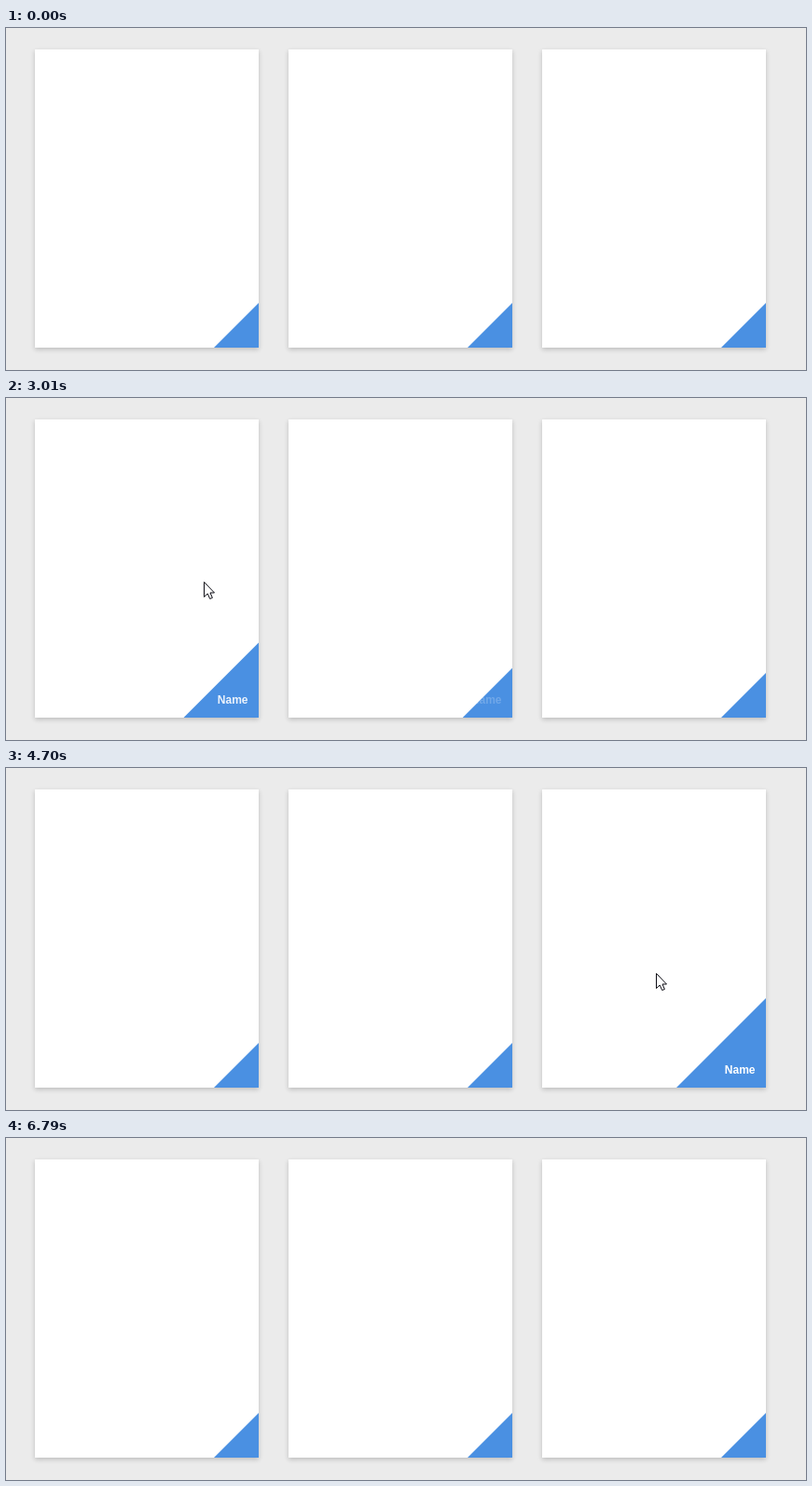
An HTML page for the animation above (8.58 s loop, 858 by 367 pixels).

```html
<!DOCTYPE html>
<html lang="en">
<head>
<meta charset="utf-8">
<title>Card corners</title>
<style>
html, body { margin: 0; height: 100%; overflow: hidden; background: #ebebeb; }
.card {
  position: absolute; top: 23px; width: 240px; height: 320px;
  background: #fff; box-shadow: 0 2px 5px rgba(0, 0, 0, .2);
}
.corner { position: absolute; right: 0; bottom: 0; background: #4a90e2; clip-path: polygon(100% 0, 100% 100%, 0 100%); }
svg { position: absolute; left: 0; top: 0; width: 858px; height: 367px; }
text { font: bold 12px Arial, "Liberation Sans", sans-serif; fill: #fff; text-anchor: end; }
#cursor { fill: #fff; stroke: #0c0c14; stroke-width: 1; }
</style>
</head>
<body>
<script>
const LOOP = 8580, STEP = 76.95, EASE_MS = 300;
const cardX = [0, 1, 2].map(i => 31 + 272 * i);

const linear = p => p;
const smooth = p => p * p * (3 - 2 * p);
const slowing = p => 1 - (1 - p) ** 1.24;
const gaining = p => p ** 1.35;
const settle = p => 1 - (1 - p) ** 5;

// Pointer moves, timed in steps; the pointer rests between them
const start = { x: 484, y: 341 };
const moves = [
  { from: 19, to: 25, x: 381, y: 237, easeX: slowing, easeY: slowing },
  { from: 28, to: 30, x: 387, y: 243, easeX: linear, easeY: linear },
  { from: 33, to: 42.05, x: 149, y: 197, easeX: smooth, easeY: settle },
  { from: 45, to: 61, x: 697, y: 220, easeX: slowing, easeY: linear },
  { from: 64, to: 84, x: 16, y: 175, easeX: gaining, easeY: linear }
];

function pointerAt(t) {
  const step = t / STEP;
  if (step < moves[0].from || step > moves.at(-1).to) return null;
  let { x, y } = start;
  for (const m of moves) {
    const p = Math.min(1, Math.max(0, (step - m.from) / (m.to - m.from)));
    if (!p) break;
    x += (m.x - x) * m.easeX(p);
    y += (m.y - y) * m.easeY(p);
  }
  return { x, y };
}

function isOver(i, point) {
  return point && point.x >= cardX[i] && point.x < cardX[i] + 240 && point.y >= 23 && point.y < 343;
}

// Times at which the pointer enters and leaves each card, alternating
const toggles = cardX.map((_, i) => {
  const times = [];
  for (let t = 0; t < LOOP; t++) {
    if (!!isOver(i, pointerAt(t)) !== times.length % 2 > 0) times.push(t);
  }
  return times;
});

const bezier = (a, b, u) => 3 * a * u * (1 - u) ** 2 + 3 * b * u * u * (1 - u) + u ** 3;

// CSS "ease", solved by bisection
function ease(x) {
  if (x <= 0) return 0;
  if (x >= 1) return 1;
  let lo = 0, hi = 1;
  for (let i = 0; i < 20; i++) {
    const mid = (lo + hi) / 2;
    if (bezier(.25, .25, mid) < x) lo = mid; else hi = mid;
  }
  return bezier(.1, 1, lo);
}

document.body.innerHTML =
  cardX.map(x => `<div class="card" style="left:${x}px"><div class="corner"></div></div>`).join('') +
  '<svg>' + cardX.map(x => `<text x="${x + 228.5}" y="328">Name</text>`).join('') +
  '<path id="cursor" d="M.5 .5V16.5L4.2 13L6.7 18.5L9.4 17.4L7 12H11.5Z"/></svg>';

const corners = document.querySelectorAll('.corner');
const labels = document.querySelectorAll('text');
const cursor = document.getElementById('cursor');

function draw(now) {
  const t = Math.floor((now % LOOP + 2) / STEP) * STEP;

  toggles.forEach((times, i) => {
    const open = times.reduce((sum, time, n) => sum + (n % 2 ? -1 : 1) * ease((t - time) / EASE_MS), 0);
    corners[i].style.width = corners[i].style.height = 48 + 48 * open + 'px';
    labels[i].style.opacity = 1 - (1 - open) ** 2;
  });

  const point = pointerAt(t);
  cursor.style.display = point ? '' : 'none';
  if (point) cursor.setAttribute('transform', `translate(${Math.round(point.x)} ${Math.round(point.y)})`);
  requestAnimationFrame(draw);
}
draw(0);
</script>
</body>
</html>
```
